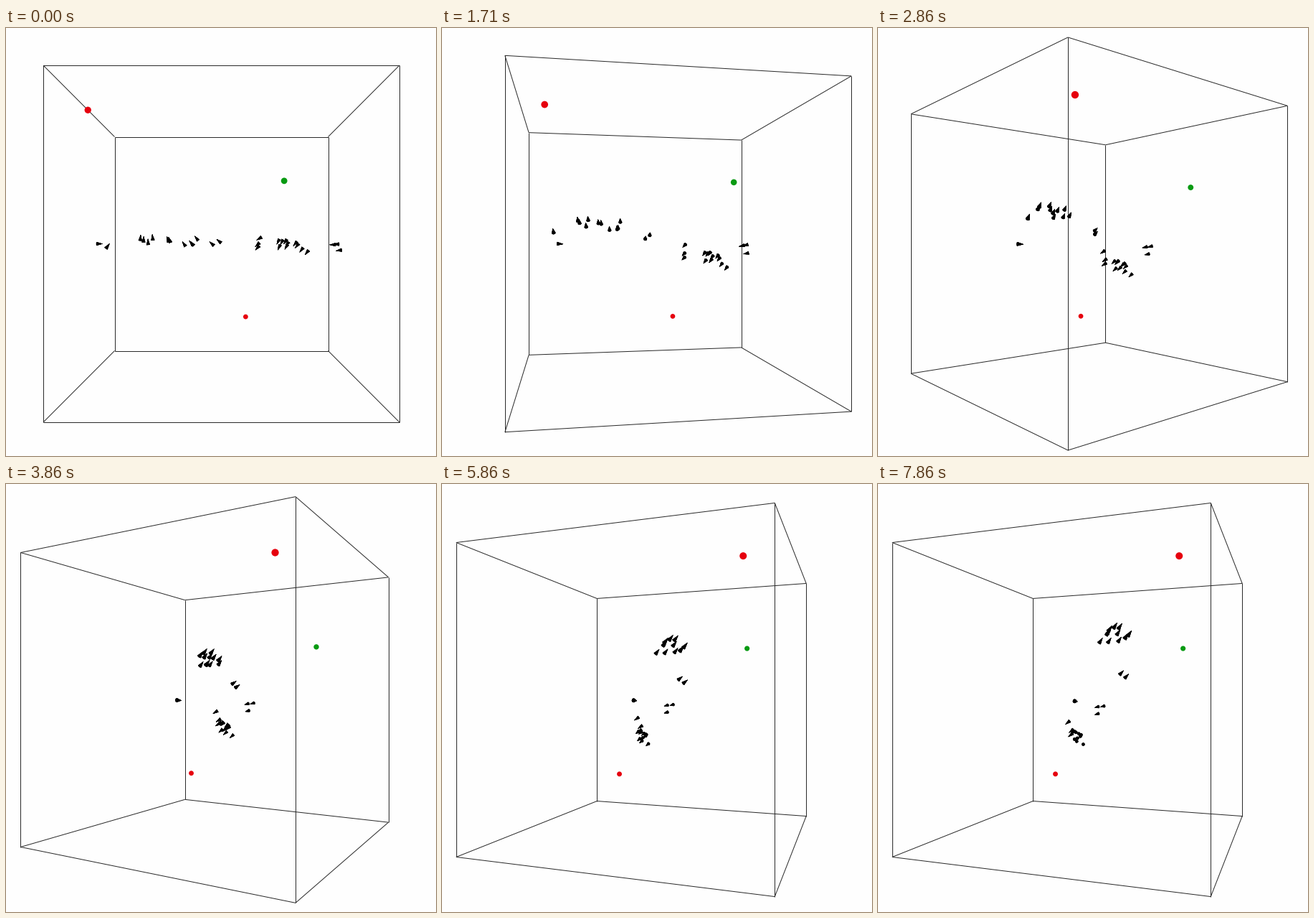
Write a matplotlib script that moves like this. It is 600 px wide and 596 px high and loops after 8000 ms.

```python
import numpy as np
import matplotlib.pyplot as plt
from itertools import combinations, product
from matplotlib.animation import FuncAnimation
from matplotlib.collections import LineCollection, PolyCollection
from matplotlib.patches import Circle

WIDTH, HEIGHT = 600, 596
FRAMES, LOOP_MS = 56, 8000
CENTER, FOCAL, CAMERA = 300, 745, 4
SIDE_YAW = np.radians(70)
CONE_LENGTH, CONE_RADIUS, CONE_SIDES = 0.042, 0.0128, 8
BALL_RADIUS = 0.02

# Times of the waypoints, and the share of the flock's drift done by each.
KNOTS = [0, 8, 12, 20, 27, 41, 53]
DRIFT_SHARE = [0, 0.18, 0.46, 0.67, 1]
START_SPREAD = np.array([1.25, 0.72])


def flock_paths(start, drift, late, boids):
    """Waypoints of boids that drift together, shape (boid, knot, 3).

    Each boid is (x, y, side x): where it is seen from the front once the
    flock has gathered, and how far across it is in the later side view.
    """
    boids = np.array(boids, float)
    drift = np.array(drift)
    front, side = boids[:, :2], (boids[:, 2] - CENTER) / FOCAL
    origin = start + START_SPREAD * (front - front.mean(axis=0))
    u = (front[:, 0] - CENTER) / FOCAL

    # Depth from crossing the front ray with the side ray.
    c, s = np.cos(SIDE_YAW), np.sin(SIDE_YAW)
    a, b = c - side * s, s + side * c
    z = ((CAMERA * side - a * (CAMERA * u + drift[0]) - b * drift[2])
         / (b - a * u))

    def unproject(screen):
        x, y = (screen.T - CENTER) / FOCAL * (CAMERA - z)
        return np.stack([x, -y, z], axis=-1)

    gathered = unproject(front)
    steps = [gathered + share * drift for share in DRIFT_SHARE]
    return np.stack([unproject(origin), *steps, steps[-1] + late], axis=1)


loner = flock_paths((130, 300), (0.10, -0.005, 0.02), (0.07, -0.005, 0.005),
                    [(162, 300, 269)])
climbers = flock_paths((218.6, 296), (-0.04, 0.24, 0.247), (-0.02, 0.07, 0.06),
                       [(152, 289, 334), (188.5, 273, 319), (192, 276, 312),
                        (197, 281, 339), (202, 272, 326), (219, 276, 311),
                        (221, 277, 324), (237, 285, 300), (245, 283, 326),
                        (246, 284, 312), (251, 274, 310)])
pair = flock_paths((291.5, 298), (-0.015, 0.097, 0.17), (-0.01, 0.039, 0.043),
                   [(280, 294, 339), (288, 289, 332)])
trailers = flock_paths((351, 300), (-0.10, -0.154, -0.22),
                       (-0.03, -0.03, -0.03),
                       [(342, 299, 271), (340, 311, 276), (340, 317, 275)])
divers = flock_paths((395.4, 302.6), (-0.10, -0.218, -0.22),
                     (-0.08, 0.012, 0.03),
                     [(373, 309, 272), (377, 310, 276), (381, 309, 274),
                      (374, 320, 274), (383, 314, 283), (382, 319, 278),
                      (392, 313, 280), (394, 317, 282), (399, 325, 277),
                      (405, 330, 286)])
outliers = flock_paths((459.7, 303.7), (-0.165, -0.039, -0.075),
                       (-0.05, -0.012, -0.03),
                       [(429, 302, 312), (433, 301, 320), (436, 313, 312)])
PATHS = np.concatenate([loner, climbers, pair, trailers, divers, outliers])

BALLS = [((-0.8, 0.8, 0.8), "#e6000e"),
         ((0.2, -0.6, -0.4), "#e6000e"),
         ((0.4, 0.4, 0.6), "#089a12")]

CORNERS = np.array(list(product((-1, 1), repeat=3)), float)
EDGES = [(i, j) for i, j in combinations(range(8), 2)
         if np.sum(CORNERS[i] != CORNERS[j]) == 1]


def project(points, yaw):
    """Screen positions and depths of points turned about the vertical axis."""
    x, y, z = np.moveaxis(np.asarray(points, float), -1, 0)
    c, s = np.cos(yaw), np.sin(yaw)
    depth = CAMERA - z * c + x * s
    screen = np.stack([CENTER + FOCAL * (x * c + z * s) / depth,
                       CENTER - FOCAL * y / depth], axis=-1)
    return screen, depth


def positions(clock):
    clock = np.clip(clock, KNOTS[0], KNOTS[-1])
    i = min(np.searchsorted(KNOTS, clock, side="right") - 1, len(KNOTS) - 2)
    t = (clock - KNOTS[i]) / (KNOTS[i + 1] - KNOTS[i])
    return PATHS[:, i] * (1 - t) + PATHS[:, i + 1] * t


def unit(v):
    return v / np.linalg.norm(v, axis=-1, keepdims=True)


def cones(clock, yaw):
    """Polygons whose union is the silhouette of every boid's cone."""
    middle = positions(clock)
    heading = unit(positions(clock + 1.5) - positions(clock - 1.5))
    side = unit(np.cross(heading, [0.31, 0.17, 0.93]))
    up = np.cross(heading, side)
    angles = np.arange(CONE_SIDES) * 2 * np.pi / CONE_SIDES
    ring = (np.cos(angles)[:, None] * side[:, None]
            + np.sin(angles)[:, None] * up[:, None])
    base = (middle - heading * CONE_LENGTH / 2)[:, None] + CONE_RADIUS * ring
    tip = middle + heading * CONE_LENGTH / 2
    base, _ = project(base, yaw)
    tip, _ = project(tip, yaw)
    polygons = []
    for apex, rim in zip(tip, base):
        polygons.append(rim)
        polygons += [np.array([apex, p, q])
                     for p, q in zip(rim, np.roll(rim, -1, axis=0))]
    return polygons


def camera_yaw(frame):
    """Hard turns of ten degrees: six in a row, and one more later."""
    turns = np.clip((frame - 6) // 3, 0, 6) + (frame >= 41)
    return np.radians(10 * turns)


fig = plt.figure(figsize=(WIDTH / 100, HEIGHT / 100), dpi=100,
                 facecolor="#fefefe")
ax = fig.add_axes([0, 0, 1, 1])
ax.set_xlim(-0.5, WIDTH - 0.5)
ax.set_ylim(HEIGHT - 0.5, -0.5)
ax.axis("off")

box = LineCollection([], colors="#2a2a2a", linewidths=0.72, zorder=1)
flock = PolyCollection([], facecolors="black", edgecolors="black",
                       linewidths=0.2, zorder=2)
ax.add_collection(box)
ax.add_collection(flock)
balls = [ax.add_patch(Circle((0, 0), 1, color=color, linewidth=0, zorder=3))
         for _, color in BALLS]


def draw(frame):
    yaw = camera_yaw(frame)
    # The flock stands still for one frame twice near the end.
    clock = frame - int(frame >= 52) - int(frame >= 54)
    corners, _ = project(CORNERS, yaw)
    box.set_segments([corners[list(edge)] for edge in EDGES])
    flock.set_verts(cones(clock, yaw))
    for ball, (point, _) in zip(balls, BALLS):
        ball.center, depth = project(point, yaw)
        ball.set_radius(FOCAL * BALL_RADIUS / depth)
    return [box, flock, *balls]


anim = FuncAnimation(fig, draw, frames=FRAMES, interval=LOOP_MS / FRAMES,
                     repeat=True, repeat_delay=0)
plt.show()
```
